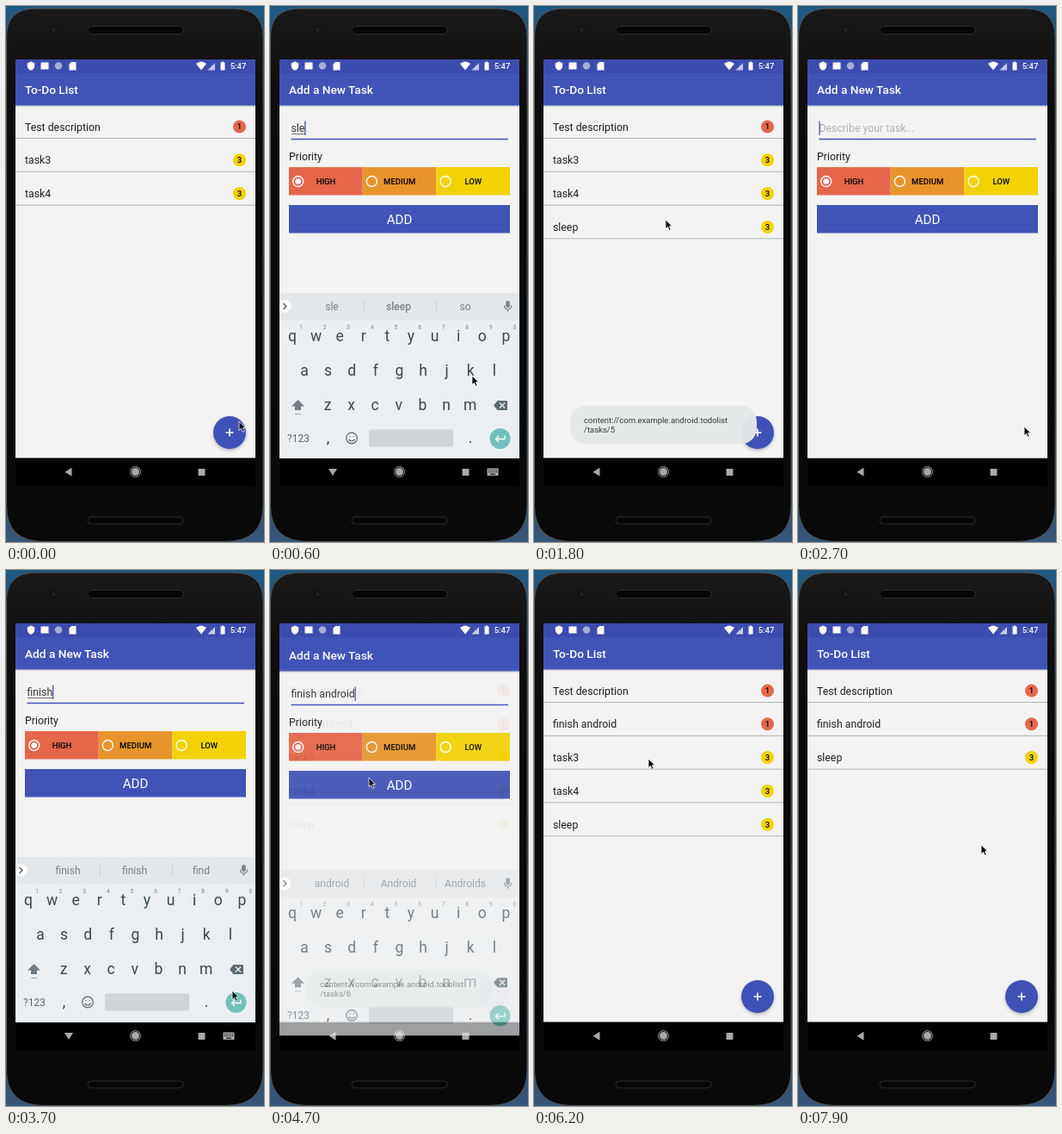
An HTML page that plays this animation: 300 px wide and 622 px high, repeating every 8 s.

```html
<!DOCTYPE html>
<html lang="en">
<head>
<meta charset="utf-8">
<title>To-Do List</title>
<style>
  html, body { margin: 0; width: 100%; height: 100%; overflow: hidden; background: #10100f; }
  svg { display: block; width: 100vw; height: 100vh; font-family: Roboto, sans-serif; }
  text { white-space: pre; }
  .title { font-size: 13.7px; font-weight: 500; fill: #fff; }
  .body { font-size: 12.3px; fill: #202020; }
  .small { font-size: 9.5px; }
  .mid { text-anchor: middle; }
  .strong { font-weight: 500; }
  .key { font-size: 17.5px; fill: #37474f; text-anchor: middle; }
  .hint { font-size: 6.5px; fill: #78868c; text-anchor: middle; }
  .word { font-size: 12px; fill: #78828a; text-anchor: middle; }
</style>
</head>
<body>
<svg viewBox="0 0 300 622" preserveAspectRatio="none">
  <defs>
    <linearGradient id="desk" x2="0" y2="1">
      <stop offset="0" stop-color="#1f5a83"/><stop offset=".5" stop-color="#1d2a33"/><stop offset="1" stop-color="#36567a"/>
    </linearGradient>
    <linearGradient id="shell" x2="0" y2="1">
      <stop offset="0" stop-color="#191919"/><stop offset=".2" stop-color="#0c0c0c"/><stop offset="1" stop-color="#090909"/>
    </linearGradient>
    <filter id="blur" x="-50%" y="-50%" width="200%" height="200%"><feGaussianBlur stdDeviation="2"/></filter>
    <clipPath id="screen"><path d="M11 62H290V557H11z"/></clipPath>
    <clipPath id="app"><path d="M11 62H290V524.5H11z"/></clipPath>
  </defs>

  <path fill="url(#desk)" d="M0 0H300V622H0z"/>
  <path fill="url(#shell)" stroke="#55595b" d="M.5 36Q.5 3 34 3H265Q299 3 299 36V580Q299 621.500 255 621.500H44Q.5 621.500 .5 580z"/>
  <g fill="#050505" stroke="#2c2c2c">
    <rect x="95" y="23.500" width="111" height="9" rx="4.500"/>
    <rect x="95" y="593" width="111" height="8" rx="4"/>
    <circle cx="55" cy="28" r="3.500" fill="#1c2020" stroke="#080808"/>
  </g>

  <g clip-path="url(#screen)">
    <path d="M11 62H290V557H11z"/>
    <g clip-path="url(#app)">
      <path fill="#f3f3f3" d="M11 115H290V525H11z"/>
      <g id="list"></g>
      <circle cx="260" cy="497" r="18.500" opacity=".3" filter="url(#blur)"/>
      <circle cx="260" cy="495" r="19" fill="#3f51b5"/>
      <path stroke="#fff" stroke-width="1.700" d="M255.500 495h9M260 490.500v9"/>
      <path fill="#000" opacity=".12" d="M11 115H290V117H11z"/>
      <path fill="#4154b6" d="M11 78H290V115.500H11z"/>
      <text class="title" x="22" y="102">To-Do List</text>

      <g id="form">
        <path fill="#f3f3f3" d="M11 78H290V525H11z"/>
        <path fill="#000" opacity=".12" d="M11 115H290V117H11z"/>
        <path fill="#4154b6" d="M11 78H290V115.500H11z"/>
        <text class="title" x="22" y="102">Add a New Task</text>
        <text class="body" id="input" x="24.500" y="146"></text>
        <path id="composing" stroke="#555" stroke-width=".8"/>
        <path id="caret" stroke="#3d4a90" stroke-width="1.200"/>
        <path stroke="#3f51b5" stroke-width="1.400" d="M24.500 154.500H277"/>
        <text class="body" x="22" y="178.500">Priority</text>
        <g id="priorities"></g>
        <path fill="#4154b6" d="M22 231H279V263.500H22z"/>
        <text class="mid" x="150.500" y="253" font-size="15" fill="#fff">ADD</text>
      </g>
    </g>

    <path fill="#3c4cae" d="M11 62H290V78H11z"/>
    <g fill="#fff">
      <path d="M29 64.500l4.200 1.700v3q0 4-4.200 5.600q-4.200-1.600-4.200-5.600v-3z"/>
      <rect x="40.500" y="65.500" width="9" height="8"/>
      <circle cx="61" cy="69.500" r="4.200" opacity=".55"/>
      <path d="M76 65h5.500v9.500h-8v-7z"/>
      <path d="M221 67q6-5 12 0l-6 7.500z"/>
      <path d="M243 66v8.500h-8.500z" opacity=".7"/>
      <path d="M251 64.500h2v1h1.500v9h-5v-9h1.500z"/>
      <text class="small strong mid" x="270" y="73">5:47</text>
    </g>
    <g fill="#a9a9a9">
      <path id="back"/>
      <circle cx="150.500" cy="540.500" r="4.500"/>
      <circle cx="150.500" cy="540.500" r="5.900" fill="none" stroke="#a9a9a9"/>
      <path d="M223.500 537h8v8h-8z"/>
      <g id="switcher">
        <path d="M252.500 536.500h13v8.500h-13z"/>
        <path stroke="#000" stroke-dasharray="1.200 1" d="M254 538.700h10M254 540.800h10"/>
        <path stroke="#000" d="M256 543.300h6"/>
      </g>
    </g>

    <g id="keyboard">
      <path fill="#eceff1" d="M11 333H290V525H11z"/>
      <path fill="#e3e7e9" d="M11 333H290V365H11z"/>
      <path stroke="#cdd2d5" d="M109.500 341v15M193.500 341v15"/>
      <circle cx="17" cy="348.500" r="7.500" fill="#fff"/>
      <path fill="none" stroke="#555" stroke-width="1.300" d="M15.500 345l3.500 3.500l-3.500 3.500"/>
      <g id="words"></g>
      <g fill="none" stroke="#78868c" stroke-width="1.200">
        <rect x="274.800" y="342.500" width="3.400" height="7" rx="1.700" fill="#78868c"/>
        <path d="M272.500 347.500q0 4.500 4 4.500t4-4.500M276.500 352v3"/>
      </g>
      <g id="keys"></g>
      <path fill="#707d84" d="M32.500 457l7.500 7.500h-4v4.500h-7v-4.500h-4z"/>
      <path stroke="#a0a9ae" d="M29 473.500h7"/>
      <path fill="#5c6a71" d="M260 463.500l4.500-5.500h11.500v11h-11.500z"/>
      <path stroke="#eceff1" stroke-width="1.400" d="M267 460.500l6 6m0-6l-6 6"/>
      <g fill="none" stroke="#5c6a71" stroke-width="1.200">
        <circle cx="95" cy="501.500" r="6.300"/>
        <path d="M91.500 503q3.500 4 7 0M92.500 499.500h1.200M96.500 499.500h1.200"/>
      </g>
      <rect x="115" y="491.500" width="98" height="20" rx="1.500" fill="#cfd4d7"/>
      <circle cx="267.500" cy="502" r="12" fill="#70c1ba"/>
      <path fill="none" stroke="#fff" stroke-width="1.400" d="M273 498.500v4h-10.500m3.500-3.500l-3.500 3.500l3.500 3.500"/>
      <text x="33" y="506" class="mid" font-size="12" fill="#5c6a71">?123</text>
    </g>

    <g id="toast">
      <rect x="42" y="464" width="217" height="44" rx="18" fill="#e5e8e8"/>
      <text class="small" fill="#333" x="58" y="484">content://com.example.android.todolist</text>
      <text class="small" fill="#333" x="58" y="495" id="path"></text>
    </g>
  </g>

  <path id="pointer" stroke="#fff" stroke-width=".8" d="M0 0V10.500L2.500 8.300L4.300 12.300L6.100 11.500L4.400 7.600H7.500z"/>
</svg>

<script>
const $ = id => document.getElementById(id);
const STEP = 100, LOOP = 8000, SWIPE = 600, TRAVEL = 500;
const RED = '#e5664a', ORANGE = '#e8942c', YELLOW = '#f3d205';

const visits = [
  { open: 0, type: 400, pace: 100, add: 1500, text: 'sleep', priority: 2, path: '/tasks/5' },
  { open: 2500, type: 3200, pace: 85, add: 4600, text: 'finish android', priority: 0, path: '/tasks/6' }
];

const tasks = [
  { name: 'Test description', color: RED },
  { name: 'finish android', color: RED, added: visits[1].add },
  { name: 'task3', color: YELLOW, swiped: 6200 },
  { name: 'task4', color: YELLOW, swiped: 7000 },
  { name: 'sleep', color: YELLOW, added: visits[0].add }
];

// Pointer stops: arrival time, x, y.
const stops = [
  [0, 271, 482], [500, 235, 429], [1100, 222, 202], [1500, 153, 248], [2500, 263, 488],
  [4400, 115, 241], [6200, 133, 219], [6700, 240, 221], [7000, 133, 219], [7500, 240, 221], [7900, 213, 319]
];

const ramp = (t, from, length) => Math.min(1, Math.max(0, (t - from) / length));
const smooth = k => k * k * (3 - 2 * k);
const label = (cls, x, y, str) => `<text class="${cls}" x="${x}" y="${y}">${str}</text>`;

function place(id, opacity, y = 0) {
  $(id).setAttribute('opacity', opacity);
  $(id).setAttribute('transform', `translate(0 ${y})`);
}

function pointerAt(t) {
  let [, x, y] = stops[0];
  stops.slice(1).forEach(([arrive, toX, toY], i) => {
    const length = Math.min(TRAVEL, arrive - stops[i][0]);
    const k = smooth(ramp(t, arrive - length, length));
    x += (toX - x) * k;
    y += (toY - y) * k;
  });
  return `${x} ${y}`;
}

function keyRow(chars, x, y, hints) {
  return [...chars].map((c, i) => label('key', x + 27.6 * i, y, c) +
    (hints ? label('hint', x + 27.6 * i + 10, 374.5, (i + 1) % 10) : '')).join('');
}

function taskRow({ name, color, swiped = LOOP }, i, t) {
  const x = 280 * ramp(t, swiped, SWIPE) ** 2;
  return `<g transform="translate(${x} ${38.8 * i})">
    <path stroke="#b0b3b5" d="M11 153.500H290"/>
    ${label('body', 22, 144.5, name)}
    <circle cx="271.500" cy="140" r="7.500" fill="${color}"/>
    ${label('small strong mid', 271.5, 143.4, color === RED ? 1 : 3)}</g>`;
}

function radio(name, color, i, chosen) {
  const width = 257 / 3, x = 22 + width * i;
  return `<rect x="${x}" y="187" width="${width}" height="32.500" fill="${color}"/>
    <circle cx="${x + 10.7}" cy="203.500" r="6" fill="none" stroke="#fff" stroke-width="1.400"/>
    <circle cx="${x + 10.7}" cy="203.500" r="${chosen ? 3.3 : 0}" fill="#fff"/>
    ${label('small strong mid', x + 43, 207, name)}`;
}

function suggestions(word) {
  if (!word) return ['I', 'the', 'we'];
  const guesses = { s: ['sleep', 'so'], f: ['finish', 'find'], a: ['Android', 'Androids'] };
  return [word, ...guesses[word[0]]];
}

function drawForm(t, visit) {
  const text = visit.text.slice(0, Math.max(0, Math.floor((t - visit.type) / visit.pace) + 1));
  const word = text.split(' ').pop();
  const input = $('input');
  input.textContent = text || 'Describe your task...';
  input.style.fill = text ? '#333' : '#aeb0b3';
  const caretX = 25 + (text ? input.getComputedTextLength() : 0);
  $('caret').setAttribute('d', `M${caretX} 133.500V150`);
  const wordWidth = word ? input.getSubStringLength(text.length - word.length, word.length) : 0;
  $('composing').setAttribute('d', t < visit.add ? `M${caretX - wordWidth} 148.500h${wordWidth}` : '');

  const chosen = t >= visit.add - 300 ? visit.priority : 0;
  $('priorities').innerHTML = ['HIGH', 'MEDIUM', 'LOW']
    .map((name, i) => radio(name, [RED, ORANGE, YELLOW][i], i, i === chosen)).join('');
  $('words').innerHTML = suggestions(word)
    .map((w, i) => label(w === 'sleep' ? 'word strong' : 'word', 72 + 77.5 * i, 353, w)).join('');
}

function drawWindows(t, { open, add, path }) {
  const enter = ramp(t, open, 200), rise = ramp(t, open + 200, 300), exit = ramp(t, add, 300);
  place('form', enter * (1 - exit ** 2.5), 14 * (1 - enter) + 18 * exit ** 2);
  place('keyboard', rise * (1 - exit), 24 * (1 - rise) ** 2 + 46 * exit);
  place('toast', .97 * ramp(t, add, 200) * (1 - ramp(t, add + 800, 200)));
  $('path').textContent = path;
  const keyboardUp = rise > .5 && exit === 0;
  $('back').setAttribute('d', keyboardUp ? 'M68 537h10l-5 8z' : 'M68.500 540.700l8-5v10z');
  $('switcher').setAttribute('opacity', keyboardUp ? 1 : 0);
}

function draw(t) {
  const visit = visits.filter(v => t >= v.open).pop();
  $('list').innerHTML = tasks
    .filter(({ added = 0, swiped = LOOP }) => t >= added && t < swiped + SWIPE)
    .map((task, i) => taskRow(task, i, t)).join('');
  drawForm(t, visit);
  drawWindows(t, visit);
  $('pointer').setAttribute('transform', `translate(${pointerAt(t)})`);
}

$('keys').innerHTML = keyRow('qwertyuiop', 26, 388.5, true) + keyRow('asdfghjkl', 40, 428.5) +
  keyRow('zxcvbnm', 67, 469) + label('key', 67.5, 507, ',') + label('key', 233, 507, '.');

const start = performance.now();
let shown = -1;
function tick() {
  const t = Math.floor((performance.now() - start) / STEP) * STEP % LOOP;
  if (t !== shown) draw(shown = t);
  requestAnimationFrame(tick);
}
tick();
</script>
</body>
</html>
```
